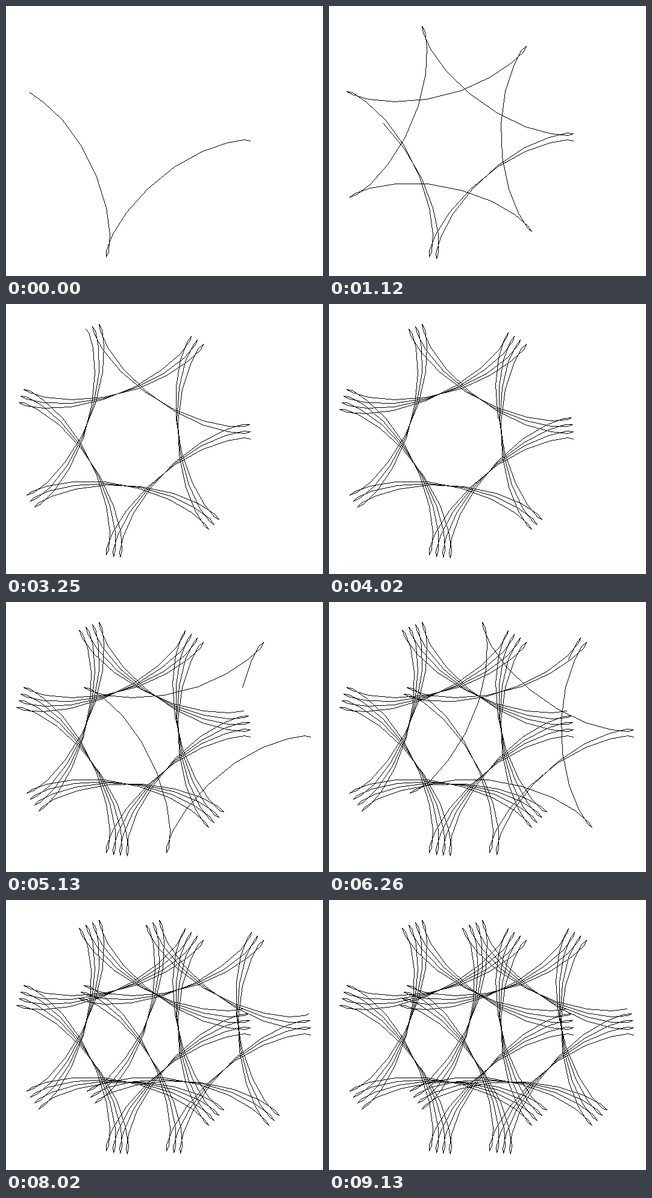
These frames come from a looping animation (526x447 px, 9.72 s). An HTML page with a canvas:

```html
<!DOCTYPE html>
<html lang="en">
<head>
<meta charset="utf-8">
<title>Spirograph</title>
<style>
  html, body { margin: 0; width: 100%; height: 100%; overflow: hidden; background: #fff; }
  canvas { display: block; width: 526px; height: 447px; }
</style>
</head>
<body>
<canvas id="stage" width="526" height="447"></canvas>
<script>
const LOOP = 9720;
const STEPS = 251;          // segments per figure
const SHIFT = 100;          // offset of the second figure
const CENTER = { x: 208.55, y: 223.52 };
const ARM = 137.05, PEN = 60, RATIO = 60 / 151;

// Drawing pace: [time in ms, segments drawn]
const PACE = [[0, 17], [1120, 78], [2470, 141], [4020, 220], [9130, 2 * STEPS]];

const canvas = document.getElementById('stage');
const ctx = canvas.getContext('2d');
let drawn = 0;

// Point on a hypotrochoid, snapped to whole pixels
function vertex(i, shift) {
  const pen = i / 2, arm = pen * RATIO;
  return [
    Math.floor(CENTER.x + ARM * Math.cos(arm) + PEN * Math.cos(pen)) + shift,
    Math.floor(CENTER.y + ARM * Math.sin(arm) - PEN * Math.sin(pen))
  ];
}

// Bresenham line without antialiasing
function line([x, y], [x2, y2]) {
  const dx = Math.abs(x2 - x), dy = -Math.abs(y2 - y);
  const sx = Math.sign(x2 - x), sy = Math.sign(y2 - y);
  let err = dx + dy;
  for (;;) {
    ctx.fillRect(x, y, 1, 1);
    if (x === x2 && y === y2) return;
    const e = 2 * err;
    if (e >= dy) { err += dy; x += sx; }
    if (e <= dx) { err += dx; y += sy; }
  }
}

function segmentsAt(time) {
  const next = PACE.findIndex(([t]) => t > time);
  if (next < 0) return 2 * STEPS;
  const [t0, n0] = PACE[next - 1], [t1, n1] = PACE[next];
  return Math.floor(n0 + (n1 - n0) * (time - t0) / (t1 - t0));
}

function render(time) {
  const count = segmentsAt(time);
  if (count < drawn) {
    ctx.clearRect(0, 0, canvas.width, canvas.height);
    drawn = 0;
  }
  for (; drawn < count; drawn++) {
    const i = drawn % STEPS, shift = drawn < STEPS ? 0 : SHIFT;
    line(vertex(i, shift), vertex(i + 1, shift));
  }
}

const start = performance.now();
function tick() {
  render((performance.now() - start) % LOOP);
  requestAnimationFrame(tick);
}
tick();
</script>
</body>
</html>
```
